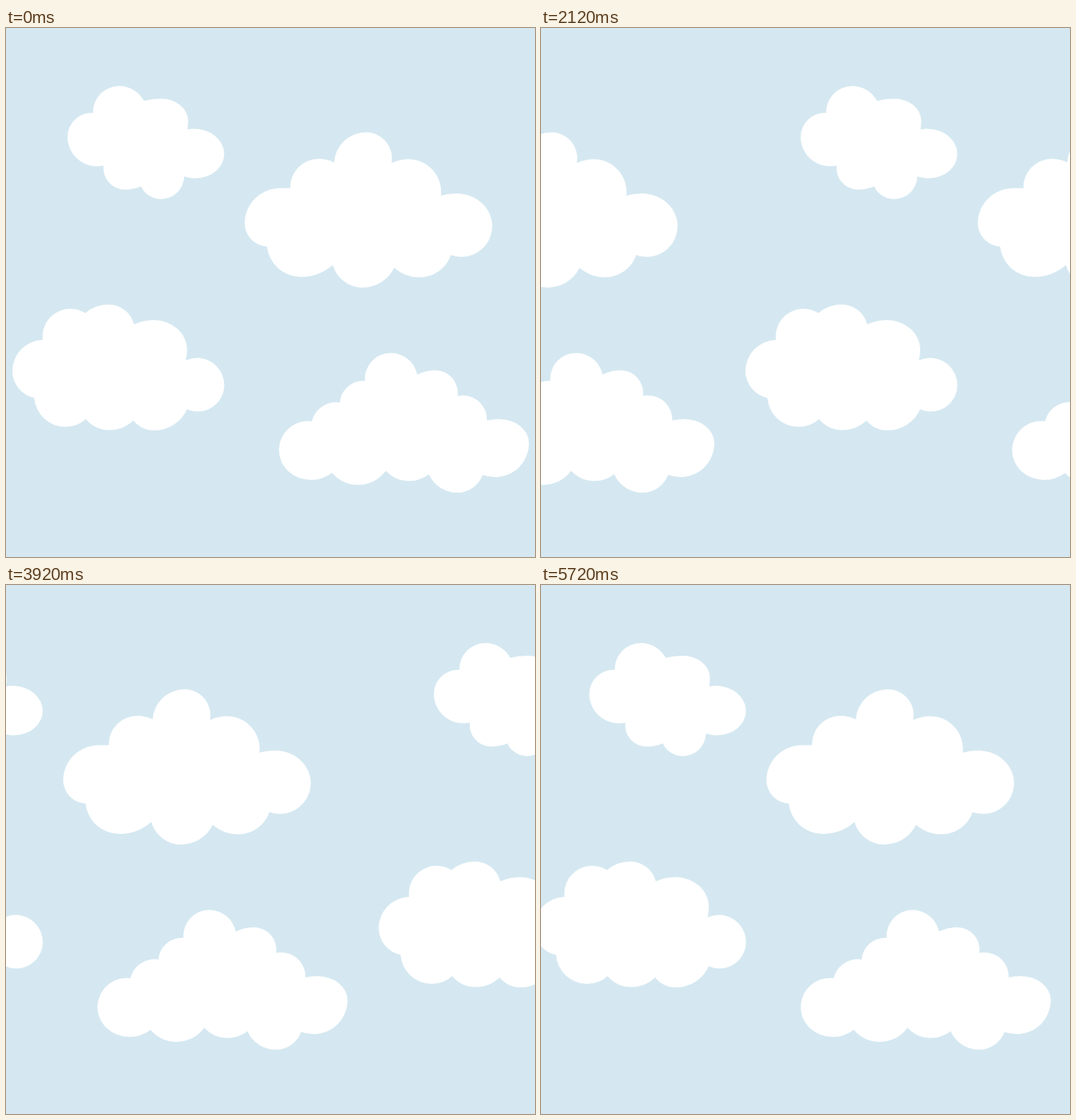
These frames come from a looping animation (748x748 px, 5760 ms). An HTML page:

```html
<!DOCTYPE html>
<html lang="en">
<head>
<meta charset="utf-8">
<title>Drifting clouds</title>
<style>
  html, body {
    margin: 0;
    width: 100%;
    height: 100%;
    overflow: hidden;
    background: #d5e8f1;
  }
  svg {
    display: block;
    width: 100vw;
    height: 100vh;
  }
  .sky {
    fill: #fff;
    animation: drift 5760ms steps(144) infinite;
  }
  @keyframes drift {
    to { transform: translateX(761.14px); }
  }
</style>
</head>
<body>
<svg viewBox="0 0 748 748">
  <g class="sky">
    <g id="clouds"></g>
    <use href="#clouds" x="-774.6"/>
  </g>
</svg>
<script>
  // Clockwise outlines: n = notch between puffs; t, r, b, l = top, right, bottom, left of a puff.
  const topLeft = 'n123,120 t160,82 n195,103 t219,100 r257.5,131 n256.5,143.5 t266,142.5 r308.5,178 b268,212.5 n252,210 b219,242 n191,224 b168,228.5 n138,194.5 l87,154';
  const topRight = 'n402,226.5 t442,185 n464,190 t509,147.5 n545,191 t569,185.5 n615,237 t637,234 r687.5,280 n629,321 b585,352.5 n549,339 b504,367 n462,335 b417,352 n369,309 l337.5,276 t388,226.5';
  const lowLeft = 'n52,441 t91,397 n112,403 t145,391 n181,419 t209,413 r256,455 n254,470 r308.5,505 n256,539 b210,569 n180,555 b146,568.5 n113,553 b84,564 n40,523 l9,485';
  const lowRight = 'n432.5,556 t467,529 n472,530 t505,499 n507.5,499 t544,459.5 n581.5,490 t607,484 n638.5,520 t646,519.5 n680,555 t697,553 r739.5,587 b692,635 n674,632 b638,657 n598,631 b570,640.5 n537,626 b498,646 n461,629 b431,639 l386,597';

  const parse = text => text.split(' ').map(item => {
    const [x, y] = item.slice(1).split(',').map(Number);
    return { kind: item[0], x, y };
  });

  // Two extremes join by a quarter ellipse; a notch and an extreme by the circle tangent there.
  function join(a, b) {
    const dx = Math.abs(b.x - a.x), dy = Math.abs(b.y - a.y);
    const end = `${b.x} ${b.y}`;
    if (a.kind !== 'n' && b.kind !== 'n') return `A${dx} ${dy} 0 0 1 ${end}`;
    const extreme = a.kind === 'n' ? b : a;
    const rise = 'tb'.includes(extreme.kind) ? dy : dx;
    if (!rise) return `L${end}`;
    const radius = (dx * dx + dy * dy) / (2 * rise);
    return `A${radius} ${radius} 0 0 1 ${end}`;
  }

  function outline(text) {
    const points = parse(text);
    const arcs = points.map((p, i) => join(p, points[(i + 1) % points.length]));
    return `M${points[0].x} ${points[0].y}${arcs.join('')}Z`;
  }

  const clouds = document.getElementById('clouds');
  for (const text of [topLeft, topRight, lowLeft, lowRight]) {
    const path = document.createElementNS('http://www.w3.org/2000/svg', 'path');
    path.setAttribute('d', outline(text));
    clouds.append(path);
  }
</script>
</body>
</html>
```
